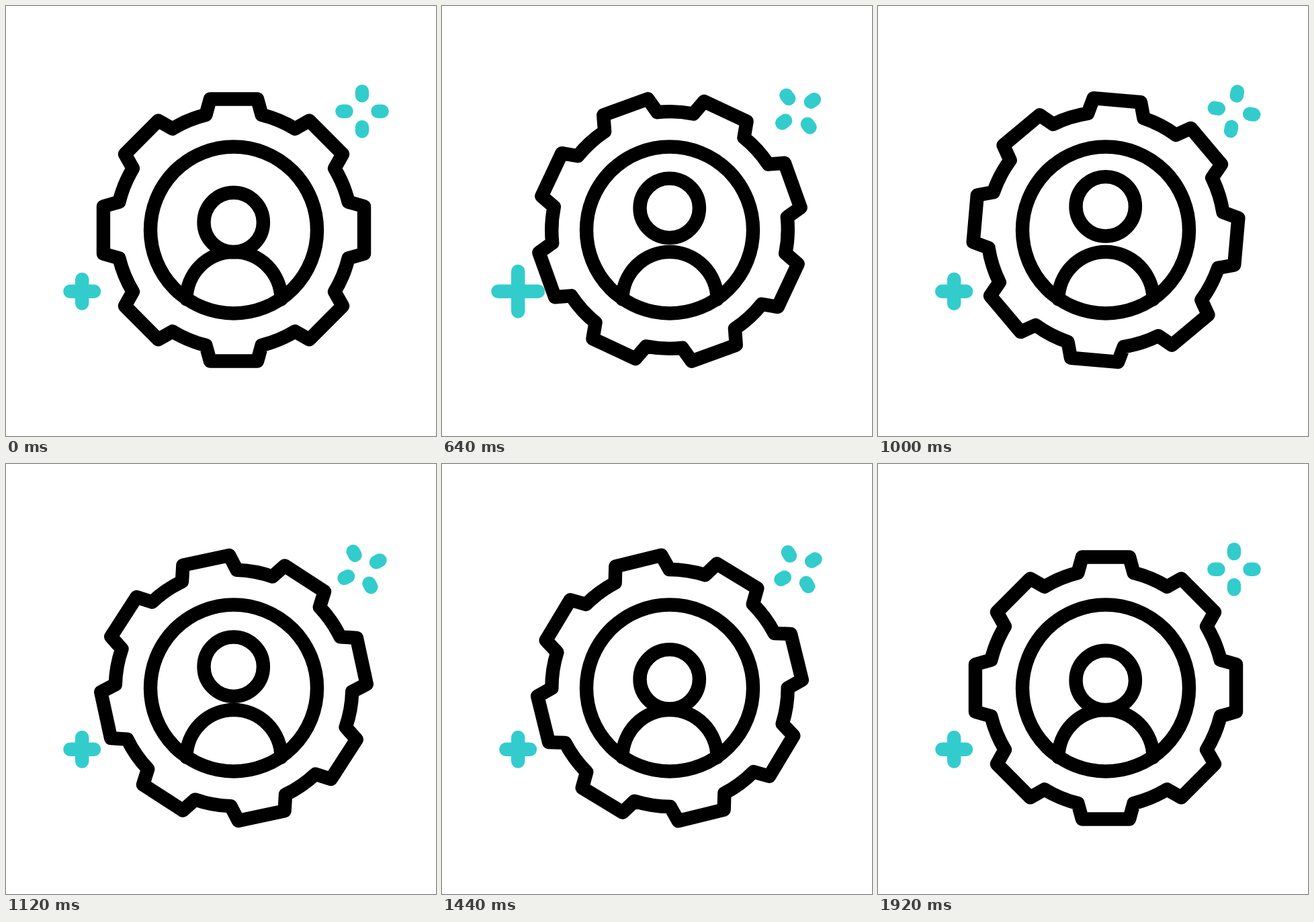
Animation of 640x640 px, one loop 2 s. Source, as an HTML page:

```html
<!DOCTYPE html>
<html lang="en">
<head>
<meta charset="utf-8">
<title>Account settings</title>
<style>
  html, body { margin: 0; width: 100%; height: 100%; overflow: hidden; background: #fff; }
  svg { display: block; width: 100vw; height: 100vh; }
  svg * { fill: none; stroke-width: 20.4; stroke-linecap: round; stroke-linejoin: round; }
  .ink { stroke: #000; }
  .accent { stroke: #33cccc; }
</style>
</head>
<body>
<svg viewBox="0 0 640 640">
  <path id="plus" class="accent"/>
  <g id="spark" class="accent">
    <path d="M0-29.6V-23.5M0 29.6V23.5M-29.6 0H-23.5M29.6 0H23.5"/>
  </g>
  <g class="ink">
    <path id="gear"/>
    <circle cx="339" cy="333.5" r="124"/>
    <path d="M268.5 436.5A70.5 70.5 0 0 1 409.5 436.5"/>
    <circle id="head" cx="338.7" r="44.2"/>
  </g>
</svg>
<script>
const LOOP = 2000, STEP = 40;
const [plus, spark, gear, head] =
  ["plus", "spark", "gear", "head"].map(id => document.getElementById(id));

function gearPath() {
  const at = (deg, r) => {
    const a = deg * Math.PI / 180;
    return (r * Math.sin(a) * 0.995).toFixed(2) + " " + (-r * Math.cos(a)).toFixed(2);
  };
  let d = "";
  for (let a = 0; a < 360; a += 45) {
    d += (a ? "A176.5 176.5 0 0 1 " : "M") + at(a - 13.7, 176.5);
    d += "L" + at(a - 10.25, 198.2) + "L" + at(a + 10.25, 198.2) + "L" + at(a + 13.7, 176.5);
  }
  return d + "A176.5 176.5 0 0 1 " + at(-13.7, 176.5) + "Z";
}

// cubic-bezier(.6, 0, .4, 1)
function ease(x) {
  if (x <= 0) return 0;
  if (x >= 1) return 1;
  let lo = 0, hi = 1, s = 0.5;
  for (let i = 0; i < 30; i++) {
    s = (lo + hi) / 2;
    const bx = 1.8 * s * (1 - s) ** 2 + 1.2 * s * s * (1 - s) + s ** 3;
    if (bx < x) lo = s; else hi = s;
  }
  return s * s * (3 - 2 * s);
}

const ramp = (t, from, to) => ease((t - from) / (to - from));
const pulse = (t, from, peak, to) => t < peak ? ramp(t, from, peak) : 1 - ramp(t, peak, to);

function draw(t) {
  const arm = 17.8 + 12.3 * pulse(t, 40, 560, 1060);
  plus.setAttribute("d", `M${-arm} 0H${arm}M0 ${-arm}V${arm}`);
  gear.setAttribute("transform", `translate(339 333.5) rotate(${180 * ramp(t, 80, 1880)})`);
  spark.setAttribute("transform", `translate(530 156.7) rotate(${360 * ramp(t, 40, 1920)})`);
  head.setAttribute("cy", 322 - 24.6 * pulse(t, 130, 870, 1610));
}

gear.setAttribute("d", gearPath());
plus.setAttribute("transform", "translate(113.2 424.8)");

const start = performance.now();
function tick() {
  const t = (performance.now() - start) % LOOP;
  draw(Math.floor(t / STEP) * STEP);
  requestAnimationFrame(tick);
}
tick();
</script>
</body>
</html>
```
